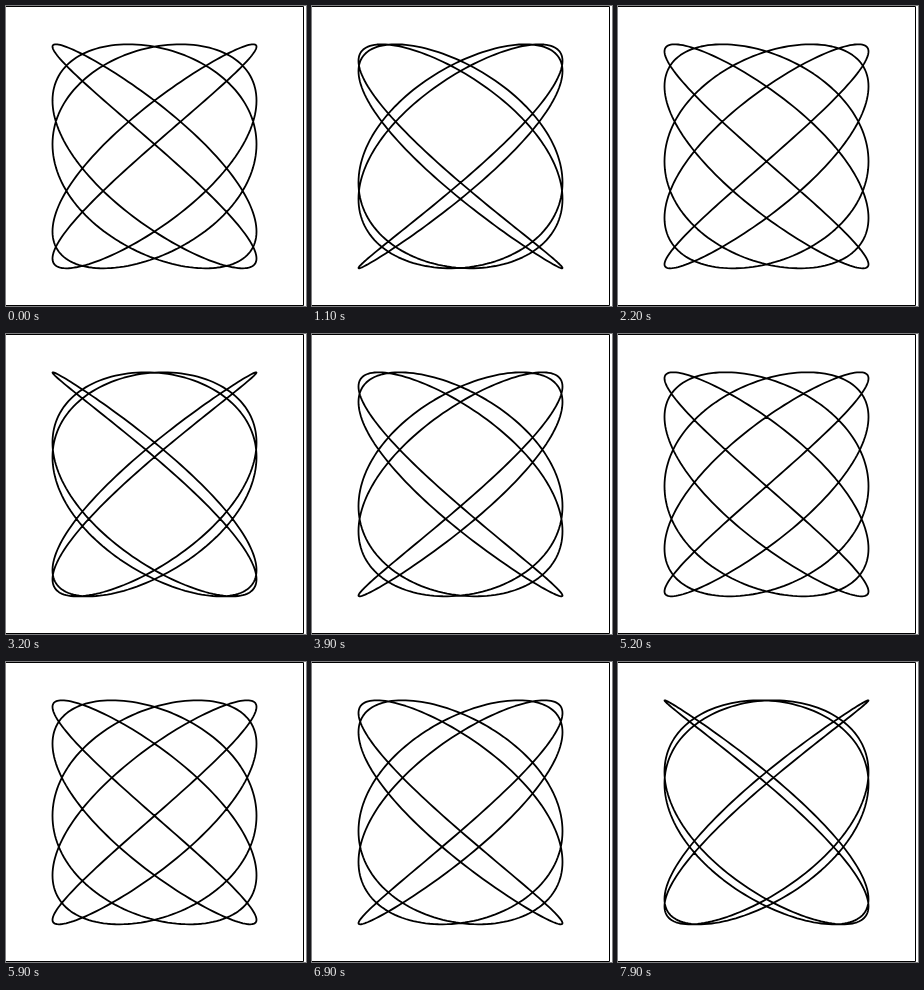
Animation, 300 px wide and 300 px high, one loop 8000 ms. Source, as an HTML page:

```html
<!DOCTYPE html>
<html>
<head>
<meta charset="utf-8">
<style>
html, body { margin: 0; width: 100%; height: 100%; overflow: hidden; background: #fff; }
svg { display: block; width: 300px; height: 300px; }
path { fill: none; stroke: #000; }
</style>
</head>
<body>
<svg viewBox="0 0 300 300">
  <path d="M0 .5H297.5V299.5H0"/>
  <path id="curve" stroke-width="1.8" stroke-linejoin="round"/>
</svg>
<script>
const curve = document.getElementById('curve');
const RAD = Math.PI / 180;
const STEP = 100, LOOP = 8000, POINTS = 720;
const START = -24.2, TURN = -4.746; // phase in degrees, and its change per step

// Lissajous figure with frequency ratio 5:4
function lissajous(phase) {
  let d = '';
  for (let i = 0; i < POINTS; i++) {
    const a = i / POINTS * 2 * Math.PI;
    const x = 148.5 + 102 * Math.cos(5 * a);
    const y = 150.3 + 112 * Math.cos(4 * a + phase);
    d += (i ? 'L' : 'M') + x.toFixed(2) + ' ' + y.toFixed(2);
  }
  return d + 'Z';
}

function draw() {
  const step = Math.floor(performance.now() % LOOP / STEP);
  curve.setAttribute('d', lissajous((START + TURN * step) * RAD));
  requestAnimationFrame(draw);
}
draw();
</script>
</body>
</html>
```
